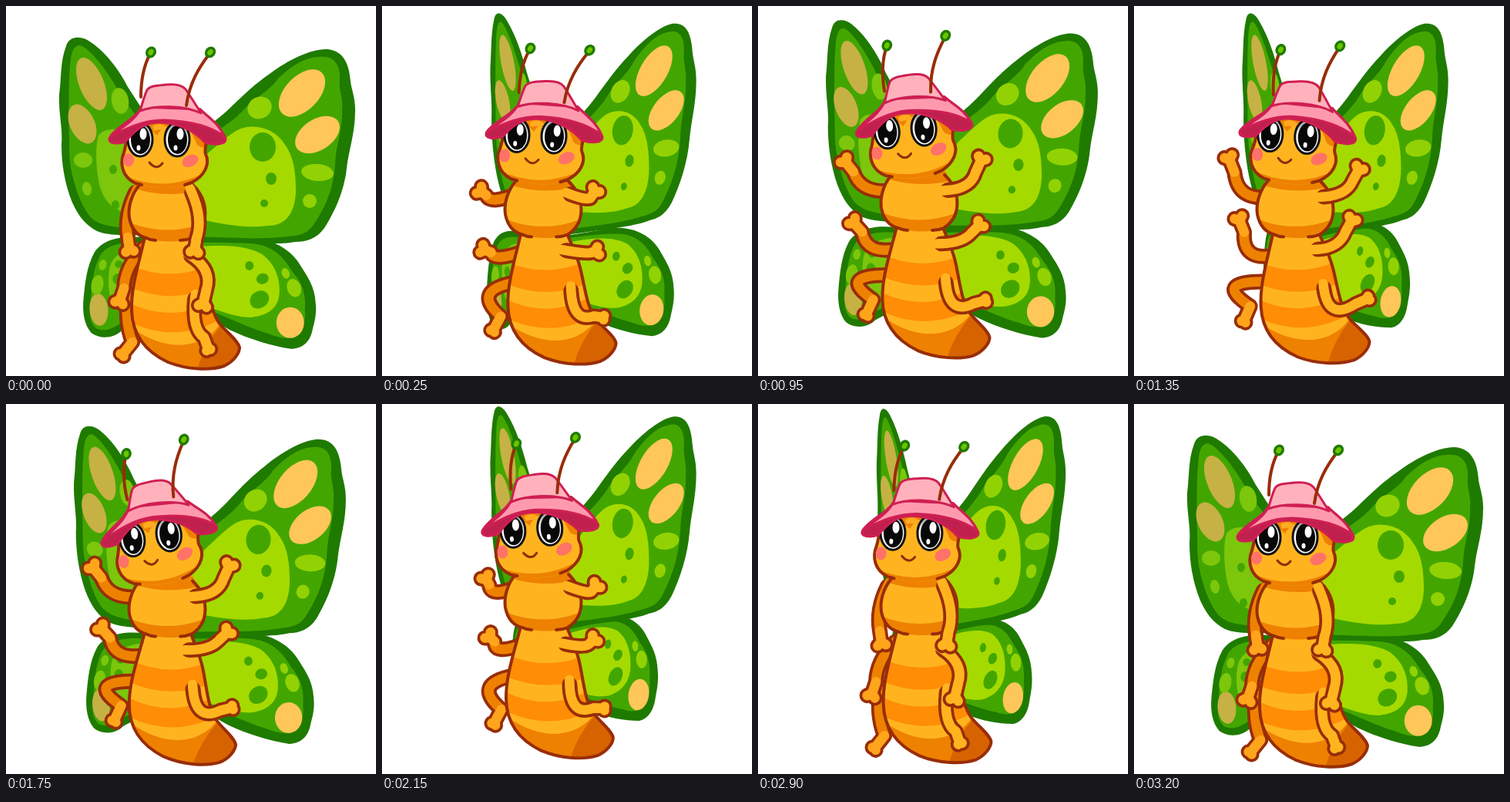
An HTML page for the animation above (3.25 s loop, 480 by 480 pixels).

```html
<!DOCTYPE html>
<html lang="en">
<head>
<meta charset="utf-8">
<title>Butterfly</title>
<style>
html, body { margin: 0; width: 100%; height: 100%; overflow: hidden; background: #fff; }
svg { display: block; width: 100vw; height: 100vh; }
.dark { fill: #1f7a00; }
.mid { fill: #43a600; }
.light { fill: #a5da00; }
.bright { fill: #92d204; }
.dim { fill: #7cc60c; }
.peach { fill: #ffc65a; }
.dull { fill: #c6b145; }
.skin { fill: #ffb41f; }
.shade { fill: #ee8100; }
.line { fill: none; stroke: #982d09; stroke-width: 4; stroke-linecap: round; stroke-linejoin: round; }
.limb path { fill: none; stroke-linecap: round; stroke-linejoin: round; }
</style>
</head>
<body>
<svg viewBox="0 0 480 480">
<defs>
  <linearGradient id="lid" x1="0" y1="0" x2="0" y2="1">
    <stop offset=".15" stop-color="#b4b4b4"/><stop offset=".45" stop-color="#fff"/>
  </linearGradient>
  <clipPath id="bellyClip"><use href="#bellyShape"/></clipPath>
  <clipPath id="chestClip"><use href="#chestShape"/></clipPath>
  <clipPath id="faceClip"><use href="#faceShape"/></clipPath>
</defs>

<g id="wingLL">
  <path class="dark" d="M200 303C150 294 125 303 114 320C104 338 102 360 100 380C98 400 102 415 110 424C122 433 140 431 150 421L200 395Z"/>
  <path class="mid" d="M200 309C150 303 130 310 121 325C111 345 111 365 109 385C107 402 109 412 116 418C128 424 140 418 150 410L200 385Z"/>
  <path class="dim" d="M200 312C155 312 138 322 134 340C130 365 134 390 150 395L200 380Z"/>
</g>
<g id="wingRL">
  <path class="dark" d="M215 303C280 305 300 297 325 301C350 305 372 318 383 338C392 352 401 365 402 385C404 400 400 412 398 420C395 436 385 445 370 445C345 441 315 432 290 420C270 409 255 400 215 380Z"/>
  <path class="mid" d="M215 308C290 306 310 306 330 310C352 316 363 330 372 345C385 360 390 375 388 395C390 410 384 420 377 427C368 434 355 431 340 425C310 416 285 402 215 375Z"/>
  <path class="light" d="M215 317C280 306 315 312 332 322C350 335 356 355 355 372C354 392 340 402 318 404C295 404 275 395 215 372Z"/>
</g>
<g id="wingLU">
  <path class="dark" d="M200 170L158 105C148 85 130 60 110 47C98 38 82 38 78 52C70 72 72 95 69 115C68 140 74 160 72 180C72 205 76 230 86 255C95 275 105 285 118 292C135 299 155 297 200 297Z"/>
  <path class="mid" d="M200 175C163 142 148 112 133 89C120 70 105 53 95 51C86 52 84 64 83 80C81 100 82 125 81 145C83 170 81 190 84 210C89 235 96 255 108 272C120 286 140 289 200 289Z"/>
  <path class="dim" d="M200 165C150 160 130 155 120 168C115 185 117 215 122 235C130 260 145 272 200 276Z"/>
</g>
<g id="wingRU">
  <path class="dark" d="M215 190C272 150 283 140 295 128C312 112 322 102 342 88C366 70 395 56 415 56C436 57 445 72 447 98C448 108 453 118 453 135C453 165 445 185 442 210C439 240 426 268 413 288C403 302 390 306 375 306C355 310 320 308 215 305Z"/>
  <path class="mid" d="M215 197C275 163 294 150 307 136C320 120 343 110 353 94C370 78 388 66 406 66C426 64 434 76 433 96C431 108 438 120 436 135C437 160 428 180 427 205C425 240 412 265 398 285C390 296 380 298 365 299C330 303 300 301 215 298Z"/>
  <path class="light" d="M215 232C275 180 290 165 305 159C325 152 350 160 362 180C373 195 376 215 376 240C375 270 362 285 340 285C310 289 280 284 215 268Z"/>
</g>

<g id="body">
  <g id="backLimbs"></g>
  <g id="belly">
    <path id="bellyShape" class="skin" d="M180 298C172 335 162 365 163 395C164 425 180 448 210 462C235 472 265 473 283 467C296 461 303 450 303 443C301 434 287 424 277 412C265 395 263 370 257 345C252 325 246 315 240 298Z"/>
    <g clip-path="url(#bellyClip)">
      <path fill="#ff8d05" d="M150 331Q212 364 275 331V361Q212 392 150 360ZM150 380Q212 416 275 380V408Q215 440 150 405Z"/>
      <path class="shade" d="M150 408Q205 452 250 435Q272 425 280 408L310 430V480H150Z"/>
      <path fill="#d76300" d="M248 472Q257 440 279 414L312 436V480Z"/>
    </g>
    <path class="line" d="M180 300C172 335 162 365 163 395C164 425 180 448 210 462C235 472 265 473 283 467C296 461 303 450 303 443C301 434 287 424 277 412C265 395 263 370 257 345C252 325 246 315 240 300"/>
    <g id="frontLegs"></g>
  </g>
  <path id="chestShape" class="skin" d="M175 226C162 245 158 262 160 275C163 290 170 297 182 301C200 307 226 307 240 301C255 292 260 278 258 262C256 248 250 240 242 226Z"/>
  <path clip-path="url(#chestClip)" class="shade" d="M150 225H265V236Q210 252 165 236ZM160 281Q210 300 258 281V320H160Z"/>
  <path class="line" d="M174 231C162 245 158 262 160 275C163 290 170 298 182 301Q188 304 194 304M226 304Q234 304 241 301C255 292 260 278 258 262C256 248 250 240 242 232"/>
  <g id="frontArm"></g>

  <g id="head">
    <path id="faceShape" class="skin" d="M163 145C157 165 156 180 153 190C147 205 151 222 168 230C190 238 225 238 241 229C258 220 265 205 259 192C256 186 263 175 261 155Q240 130 210 130Q175 130 163 145Z"/>
    <g clip-path="url(#faceClip)">
      <path class="shade" d="M145 140H270V175Q258 189 248 180L236 154Q205 150 196 168Q180 150 160 165L150 200ZM145 216Q205 246 262 214V245H145Z"/>
      <path fill="#ffab22" d="M190 156Q200 150 208 157L206 162Q198 159 192 162Z"/>
    </g>
    <path class="line" d="M161 158C156 170 156 180 153 190C147 205 151 222 168 230L176 232M232 232L241 229C258 220 265 205 259 192C256 186 263 175 261 155"/>
    <g id="eyes"></g>
    <g fill="#ff7268">
      <ellipse cx="159" cy="200" rx="7" ry="8.5"/>
      <ellipse cx="239" cy="201" rx="11" ry="7.5" transform="rotate(-25 239 201)"/>
    </g>
    <path d="M186 203Q195 214 203 204" fill="none" stroke="#8c2f0a" stroke-width="3" stroke-linecap="round"/>
    <g class="feeler"><path class="line" d="M187 62C180 75 175 92 175 118"/></g>
    <g stroke="#cf1f52" stroke-width="3" stroke-linejoin="round">
      <path fill="#c0204e" d="M134 172C136 165 150 155 160 148C168 142 172 138 176 131L252 134C262 144 277 153 285 172C286 180 270 181 258 177C243 160 220 151 198 151C178 151 166 163 155 176C143 180 133 178 134 172Z"/>
      <path fill="#ff9aae" d="M136 169C147 159 167 150 176 131L252 134C262 145 276 152 283 169C265 156 240 149 205 148C178 148 158 158 136 169Z"/>
      <path fill="#ffb2bc" d="M174 136C178 122 180 115 183 109C187 103 198 103 208 102C219 101 229 103 233 108C240 118 246 128 253 139C232 129 195 128 174 136Z"/>
    </g>
    <g class="feeler">
      <path class="line" d="M264 62C250 80 238 100 234 129"/>
      <g fill="#6cc400" stroke="#1f7a00" stroke-width="3.5">
        <ellipse cx="188" cy="60" rx="5" ry="6" transform="rotate(30 188 60)"/>
        <ellipse cx="265" cy="60" rx="5" ry="6" transform="rotate(40 265 60)"/>
      </g>
    </g>
  </g>
</g>
</svg>
<script>
const byId = id => document.getElementById(id);
const NS = 'http://www.w3.org/2000/svg';

function add(parent, tag, attrs) {
  const el = document.createElementNS(NS, tag);
  for (const k in attrs) el.setAttribute(k, attrs[k]);
  return parent.appendChild(el);
}
function oval(parent, cls, cx, cy, rx, ry, turn = 0) {
  return add(parent, 'ellipse', { class: cls, cx, cy, rx, ry, transform: `rotate(${turn} ${cx} ${cy})` });
}

// Wing spots: class, centre, radii, turn.
const spots = {
  wingRU: [['peach', 384, 113, 37, 22, -46], ['peach', 404, 167, 32, 20, -33], ['bright', 329, 132, 16, 14, -25],
    ['bright', 404, 216, 21, 11, 5], ['bright', 394, 253, 9, 9], ['mid', 333, 183, 17, 19], ['mid', 344, 224, 7, 8], ['mid', 335, 256, 5, 5]],
  wingRL: [['peach', 369, 411, 18, 20], ['bright', 363, 347, 5, 7, -20], ['bright', 374, 366, 9, 12, -20],
    ['mid', 316, 337, 5.5, 6], ['mid', 333, 354, 8, 7, -15], ['mid', 329, 381, 13, 11, -35]],
  wingLU: [['dull', 111, 101, 16, 36, -22], ['dull', 99, 153, 16, 27, -25], ['dim', 148, 123, 11, 17, -10],
    ['dim', 100, 200, 12, 10], ['dim', 105, 237, 6, 9, -10], ['mid', 139, 212, 5, 6], ['mid', 142, 258, 5, 6]],
  wingLL: [['dull', 120, 394, 12, 21, -5], ['dim', 125, 336, 5, 7, 15], ['dim', 118, 362, 8, 13, 10],
    ['mid', 146, 335, 5, 5], ['mid', 144, 354, 6, 7]]
};
for (const id in spots) spots[id].forEach(s => oval(byId(id), ...s));

for (const x of [174, 222]) {
  const eye = (dx, y, rx, ry, style) => oval(byId('eyes'), '', x + dx, y, rx, ry).setAttribute('style', style);
  eye(0, 173, 16, 22, 'fill:url(#lid);stroke:#111;stroke-width:3');
  eye(.5, 173.5, 12.5, 18.5, 'fill:#080808');
  eye(4, 166, 4.5, 7.5, 'fill:#fff');
  eye(-2, 184, 2.5, 3.5, 'fill:#fff');
}

// Limbs: four points (root, bend, wrist, palm) for the lowered and raised poses, and the wave of the palm.
const limbs = [
  { host: 'backLimbs', back: 1, foot: 1, wave: [1, 0], down: [160, 370, 152, 405, 164, 436, 152, 451], up: [168, 362, 102, 362, 150, 394, 142, 412] },
  { host: 'backLimbs', back: 1, wave: [6, -6], down: [178, 314, 154, 338, 153, 366, 148, 381], up: [182, 328, 140, 336, 139, 302, 131, 289] },
  { host: 'backLimbs', back: 1, wave: [5, -6], down: [168, 242, 153, 272, 158, 300, 160, 314], up: [176, 252, 134, 258, 127, 224, 119, 210] },
  { host: 'frontLegs', foot: 1, wave: [3, -4], down: [245, 380, 241, 420, 257, 430, 262, 444], up: [245, 372, 250, 416, 284, 396, 298, 391] },
  { host: 'frontLegs', wave: [-2, -6], down: [240, 324, 268, 342, 260, 368, 256, 385], up: [238, 321, 266, 320, 276, 302, 284, 291] },
  { host: 'frontArm', wave: [1, 2], down: [241, 242, 256, 276, 247, 302, 245, 315], up: [246, 252, 276, 250, 283, 230, 290, 216] }
];
for (const limb of limbs) {
  const g = add(byId(limb.host), 'g', { class: 'limb' });
  const stroke = (color, width) => add(g, 'path', { stroke: color, 'stroke-width': width });
  limb.edge = stroke('#982d09', 20);
  limb.arm = stroke(limb.back ? '#ee8200' : '#ffb41f', 12.5);
  limb.hand = stroke(limb.back ? '#ffa51c' : '#ffb41f', 12.5);
}

function drawLimb(limb, raise, wave) {
  const p = limb.down.map((v, i) => v + (limb.up[i] - v) * raise);
  for (const i of [4, 6]) {
    p[i] += limb.wave[0] * wave * raise * i / 6;
    p[i + 1] += limb.wave[1] * wave * raise * i / 6;
  }
  const [x0, y0, x1, y1, x2, y2, x3, y3] = p;
  const angle = Math.atan2(y3 - y2, x3 - x2);
  const reachOut = limb.foot ? 3.5 : 7;
  const finger = a => `M${x3} ${y3}l${reachOut * Math.cos(angle + a)} ${reachOut * Math.sin(angle + a)}`;
  const hand = finger(-0.85) + finger(0.85);
  const len = Math.hypot(x1 - x0, y1 - y0);
  const bx = x0 - 6 * (x1 - x0) / len, by = y0 - 6 * (y1 - y0) / len;
  const reach = `Q${x1} ${y1} ${x2} ${y2}L${x3} ${y3}`;
  limb.edge.setAttribute('d', `M${x0} ${y0}${reach}${hand}`);
  limb.arm.setAttribute('d', `M${bx} ${by}L${x0} ${y0}${reach}`);
  limb.hand.setAttribute('d', `M${x2} ${y2}L${x3} ${y3}${hand}`);
}

const clamp = v => Math.max(0, Math.min(1, v));
const smooth = u => u * u * (3 - 2 * u);
const cubic = u => u < .5 ? 4 * u ** 3 : 1 - 4 * (1 - u) ** 3;

// Step, head shift, head tilt, feeler tilt, belly tilt.
const poses = [
  [0, 0, 0, 0, 0], [11, -2, 4, 0, -.5], [19, -2, -4.5, -5, 1], [27, -1, 3.5, -7, -1],
  [35, -2, -8, -6, 2], [51, 1, 1, 1, .5], [64, 0, 0, 0, 0]
];
function poseAt(n) {
  const i = Math.max(1, poses.findIndex(k => k[0] >= n));
  const a = poses[i - 1], b = poses[i];
  const u = smooth((n - a[0]) / (b[0] - a[0]));
  return a.map((v, k) => v + (b[k] - v) * u);
}

function fold(n) {
  const p = (n + 16) % 16;
  return cubic(p <= 8 ? p / 8 : (16 - p) / 8);
}
function setWing(id, squeeze, x0, skew, y0, bob) {
  byId(id).setAttribute('transform', `matrix(${1 - squeeze} ${skew} 0 1 ${squeeze * x0} ${bob - skew * y0})`);
}

function draw(n) {
  const p = n % 32;
  const ramp = p <= 16 ? p / 16 : 2 - p / 16;
  const bob = -15.5 * (.75 * ramp + .25 * smooth(ramp));
  const s = fold(n), low = fold(n - 1);
  setWing('wingRU', .26 * s, 232, -.177 * s, 210, bob);
  setWing('wingRL', .267 * low, 225, -.17 * low, 225, bob);
  setWing('wingLU', .588 * s, 223, (47 * s - 19 * s * s) / 125, 223, bob);
  setWing('wingLL', .8 * low, 190, .2 * low, 190, bob);

  const raise = smooth(clamp(n / 8)) * (1 - smooth(clamp((n - 40) / 8)));
  const wave = -Math.cos((n - 3) * Math.PI / 8);
  limbs.forEach(limb => drawLimb(limb, raise, wave));

  const [, shift, tilt, feeler, belly] = poseAt(n);
  byId('body').setAttribute('transform', `translate(0 ${bob})`);
  byId('head').setAttribute('transform', `translate(${shift} 0) rotate(${tilt} 207 235)`);
  byId('belly').setAttribute('transform', `rotate(${belly} 210 300) translate(0 ${3.6 * raise}) scale(1 ${1 - .012 * raise})`);
  document.querySelectorAll('.feeler').forEach(f => f.setAttribute('transform', `rotate(${feeler} 205 120)`));
}

const start = performance.now();
function tick(now) {
  draw(Math.floor(Math.max(0, now - start) % 3250 / 50));
  requestAnimationFrame(tick);
}
draw(0);
requestAnimationFrame(tick);
</script>
</body>
</html>
```
